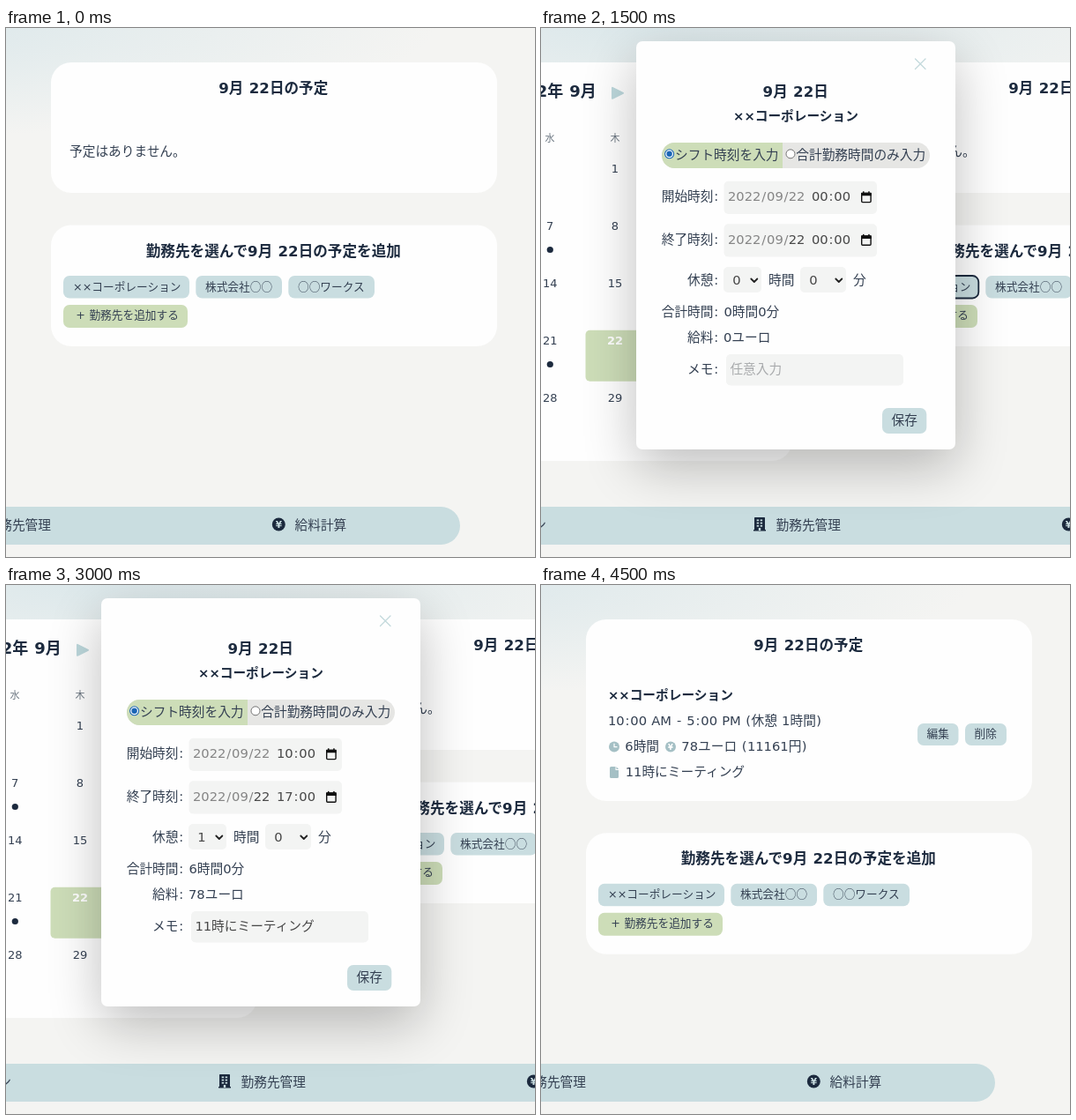
An HTML page that plays this animation: 600x600 px, repeating every 6000 ms.

```html
<!DOCTYPE html>
<html lang="ja">
<head>
<meta charset="utf-8">
<title>シフト管理</title>
<style>
html, body { margin: 0; width: 100%; height: 100%; overflow: hidden; background: #f4f4f2; }
svg { display: block; width: 600px; height: 600px; }
text { font-family: "DejaVu Sans", "Noto Sans CJK JP", sans-serif; word-spacing: .034em; }
.jp { font-family: "Noto Sans CJK JP", "Noto Sans CJK", sans-serif; font-weight: 300; }
.pt { letter-spacing: .058em; }
.br { letter-spacing: .032em; }
.b, .b .jp { font-weight: 700; }
</style>
</head>
<body>
<svg id="stage" viewBox="0 0 600 600" xmlns="http://www.w3.org/2000/svg"></svg>
<script>
const STEP = 1500, COUNT = 4, PAN = 289;
const BLUE = '#c9dde0', GREEN = '#cdddb8', FIELD = '#f3f4f3', SOFT = '#a5c0c5';
const INK = '#1c2a3e', THIN = '#344052', GREY = '#858585', DARK = '#484848';
const BODY = 14.7, SMALL = 12.7, HEAD = 16.6;

// Latin glyphs, punctuation and kanji/kana each get their own spacing.
const runs = s => s.replace(/[^\x20-\x7e×¥]+|[:\/-]+|[()]+/g, m => {
  if (/[:\/-]/.test(m)) return `<tspan class="pt" dx=".058em">${m}</tspan>`;
  if (/[()]/.test(m)) return `<tspan class="br" dx=".032em">${m}</tspan>`;
  return `<tspan class="jp">${m}</tspan>`;
});
const text = (x, y, s, size = BODY, { bold, at = 'start', fill = bold ? INK : THIN } = {}) =>
  `<text x="${x}" y="${y}" font-size="${size}" text-anchor="${at}" class="${bold ? 'b' : ''}" fill="${fill}">${runs(s)}</text>`;
const mid = (x, y, s, size, bold, fill) => text(x, y, s, size, { bold, at: 'middle', fill });
const box = (x, y, w, h, r, fill, extra = '') =>
  `<rect x="${x}" y="${y}" width="${w}" height="${h}" rx="${r}" fill="${fill}" ${extra}/>`;
const dot = (x, y, r, fill, extra = '') => `<circle cx="${x}" cy="${y}" r="${r}" fill="${fill}" ${extra}/>`;
const line = (d, color, w) =>
  `<path d="${d}" fill="none" stroke="${color}" stroke-width="${w}" stroke-linecap="round" stroke-linejoin="round"/>`;
const group = (content, dx = 0, dy = 0) => `<g transform="translate(${dx} ${dy})">${content}</g>`;
const on = (steps, content) => `<g data-on="${steps}">${content}</g>`;
const yen = (x, y, r, fill, ink) => dot(x, y, r, fill) + mid(x, y + r * .52, '¥', r * 1.4, true, ink);

const addCard = () =>
  box(51, 223.5, 506, 137.5, 23, '#fefefe') +
  mid(303.3, 258.5, '勤務先を選んで9月 22日の予定を追加', HEAD, true) +
  box(65, 281, 143, 25.5, 7, BLUE) + text(76, 297.6, '××コーポレーション', SMALL) +
  on('1', box(65, 281, 142.3, 25.5, 7, 'none', `stroke="${INK}" stroke-width="1.8"`)) +
  box(215.3, 281, 97.7, 25.5, 7, BLUE) + text(226, 297.6, '株式会社○○', SMALL) +
  box(320.3, 281, 97.7, 25.5, 7, BLUE) + text(331, 297.6, '○○ワークス', SMALL) +
  box(65, 314, 141, 26, 7, GREEN) + text(79.3, 330.3, '+ 勤務先を追加する', SMALL);

const emptyDay = () =>
  box(51, 39, 506, 148, 23, '#fefefe') + text(72, 144.5, '予定はありません。');

const plannedDay = () =>
  box(51, 39, 506, 206, 23, '#fefefe') +
  text(76, 130, '××コーポレーション', BODY, { bold: true }) +
  text(76, 159, '10:00 AM - 5:00 PM (休憩 1時間)') +
  dot(83, 183.5, 6, SOFT) + line('M83 180V183.7H86', '#fff', 1.2) + text(95.3, 188, '6時間') +
  yen(147, 183.5, 6, SOFT, '#fff') + text(159.3, 188, '78ユーロ (11161円)') +
  `<path d="M79.5 206H84.5V210H88V217.5Q88 219 86.5 219H79.5Q78 219 78 217.5V207.5Q78 206 79.5 206ZM85.5 206L88 209H85.5Z" fill="${SOFT}"/>` +
  text(95.7, 217, '11時にミーティング') +
  box(427, 157, 46.5, 25, 7, BLUE) + mid(450.2, 173.2, '編集', SMALL) +
  box(481, 157, 47, 25, 7, BLUE) + mid(504.3, 173.2, '削除', SMALL);

// Month card, in panned coordinates.
function calendar() {
  let s = box(-260, 39, 545, 452, 23, '#fefefe') +
    text(62.7, 78, '2022年 9月', 18, { bold: true, at: 'end' }) +
    `<path d="M81 67.8L93 73.8L81 79.8Z" fill="#bdd8dc" stroke="#bdd8dc" stroke-width="2" stroke-linejoin="round"/>` +
    mid(10, 128.5, '水', 11, false, '#6b7681') + mid(84, 128.5, '木', 11, false, '#6b7681') +
    box(50.5, 342.7, 66, 58, 5, GREEN);
  for (let w = 0; w < 5; w++) {
    const y = 164 + 65 * w, thu = 1 + 7 * w, today = thu === 22;
    if (w) s += mid(10.2, y, String(thu - 1), 13);
    s += mid(84, y, String(thu), 13, today, today ? '#fff' : THIN);
  }
  return s + dot(10.3, 251.5, 3.6, INK) + dot(10.3, 381.5, 3.6, INK);
}

function nav() {
  let s = box(-600, 543, 1115, 43, 21.5, BLUE) +
    text(-283, 569, 'ン', BODY, { at: 'end' }) +
    text(51, 569, '勤務先管理', BODY, { at: 'end' }) +
    yen(309.3, 563, 7.5, INK, BLUE) + text(327.5, 569, '給料計算');
  const bx = 242 - PAN;
  s += box(bx, 555, 12, 15, .5, INK) + box(bx - 1, 569, 14, 1.5, 0, INK);
  for (let i = 0; i < 6; i++) s += box(bx + 2.7 + 4 * (i % 2), 557.5 + 3.2 * (i >> 1), 2.4, 1.7, 0, BLUE);
  return s + box(bx + 4.8, 567, 2.4, 3, 0, BLUE);
}

const swap = (x, y, early, late, fill, lateFill = fill) =>
  on('1', text(x, y, early, BODY, { fill })) + on('2', text(x, y, late, BODY, { fill: lateFill }));

const dateField = (y, label, dayFill, early, late) =>
  text(136.7, y + 22.7, label) + box(207.5, y, 173.5, 37.3, 5, FIELD) +
  text(212, y + 22.7, '2022/09/', BODY, { fill: GREY }) +
  text(280.7, y + 22.7, '22', BODY, { fill: dayFill }) +
  swap(307, y + 22.7, early, late, DARK) +
  box(363.7, y + 13.7, 10.4, 10.2, 1, 'none', 'stroke="#111" stroke-width="1.4"') +
  box(363, y + 13, 11.8, 3.6, .5, '#111') +
  box(365, y + 11.6, 1.5, 2, 0, '#111') + box(371.2, y + 11.6, 1.5, 2, 0, '#111');

const select = (x, w, early, late) =>
  box(x, 271, w, 29, 5, FIELD) +
  swap(x + 10.3, 290.5, early, late, DARK) +
  line(`M${x + w - 11.7} 284.5l3.5 3.5l3.5 -3.5`, '#222', 1.8);

const modal = () =>
  box(108, 35, 362, 463, 8, '#000', 'opacity=".25" filter="url(#blur)"') +
  box(108, 15, 362, 463, 7, '#fefefe') +
  line('M424.5 35L436 46.5M436 35L424.5 46.5', '#c3d9dc', 1.3) +
  mid(288.7, 78.2, '9月 22日', HEAD, true) +
  mid(289, 105.3, '××コーポレーション', BODY, true) +
  box(137, 130, 304, 29, 14.5, '#e6e6e4') +
  `<path d="M274 130H151.5A14.5 14.5 0 0 0 151.5 159H274Z" fill="${GREEN}"/>` +
  dot(145.6, 142.8, 5, '#fff', 'stroke="#1b66b5" stroke-width="1.1"') + dot(145.6, 142.8, 3.2, '#1b66b5') +
  dot(283, 142.8, 5, '#fff', 'stroke="#767676" stroke-width="1"') +
  text(152, 148.8, 'シフト時刻を入力') + text(289.3, 148.8, '合計勤務時間のみ入力') +
  dateField(173.7, '開始時刻:', GREY, '00:00', '10:00') +
  dateField(222.3, '終了時刻:', DARK, '00:00', '17:00') +
  text(166, 290.5, '休憩:') + select(207, 43, '0', '1') + text(258, 290.5, '時間') +
  select(294, 52, '0', '0') + text(354, 290.5, '分') +
  text(136.7, 326.6, '合計時間:') + swap(207.5, 326.6, '0時間0分', '6時間0分') +
  text(166, 355.7, '給料:') + swap(207, 355.7, '0ユーロ', '78ユーロ') +
  text(166, 392, 'メモ:') + box(210, 370, 201, 35.5, 5, FIELD) +
  swap(214.4, 392, '任意入力', '11時にミーティング', '#a8aaac', DARK) +
  box(387, 431, 50.3, 29, 7, BLUE) + mid(412.2, 449.5, '保存', BODY);

const stage = document.getElementById('stage');
stage.innerHTML = `
  <defs>
    <radialGradient id="sky"><stop offset="0" stop-color="#dae7ea"/><stop offset="1" stop-color="#f4f4f2"/></radialGradient>
    <filter id="blur" filterUnits="userSpaceOnUse" x="-60" y="-100" width="720" height="760"><feGaussianBlur stdDeviation="30"/></filter>
  </defs>` +
  box(0, 0, 600, 600, 0, '#f4f4f2') +
  '<g id="page">' +
  '<ellipse cx="-150" cy="-10" rx="640" ry="135" fill="url(#sky)"/>' +
  on('12', group(calendar(), -PAN)) +
  on('012', emptyDay() + addCard()) +
  on('3', plannedDay() + group(addCard(), 0, 57.7)) +
  mid(303.3, 74, '9月 22日の予定', HEAD, true) +
  nav() + '</g>' + on('12', modal());

const page = document.getElementById('page');
const parts = [...stage.querySelectorAll('[data-on]')];
const start = performance.now();
let shown = -1;

function draw() {
  const step = Math.floor((performance.now() - start) / STEP) % COUNT;
  if (step !== shown) {
    shown = step;
    page.setAttribute('transform', `translate(${step === 1 || step === 2 ? PAN : 0} 0)`);
    for (const p of parts) p.style.display = p.dataset.on.includes(step) ? '' : 'none';
  }
  requestAnimationFrame(draw);
}
draw();
</script>
</body>
</html>
```
